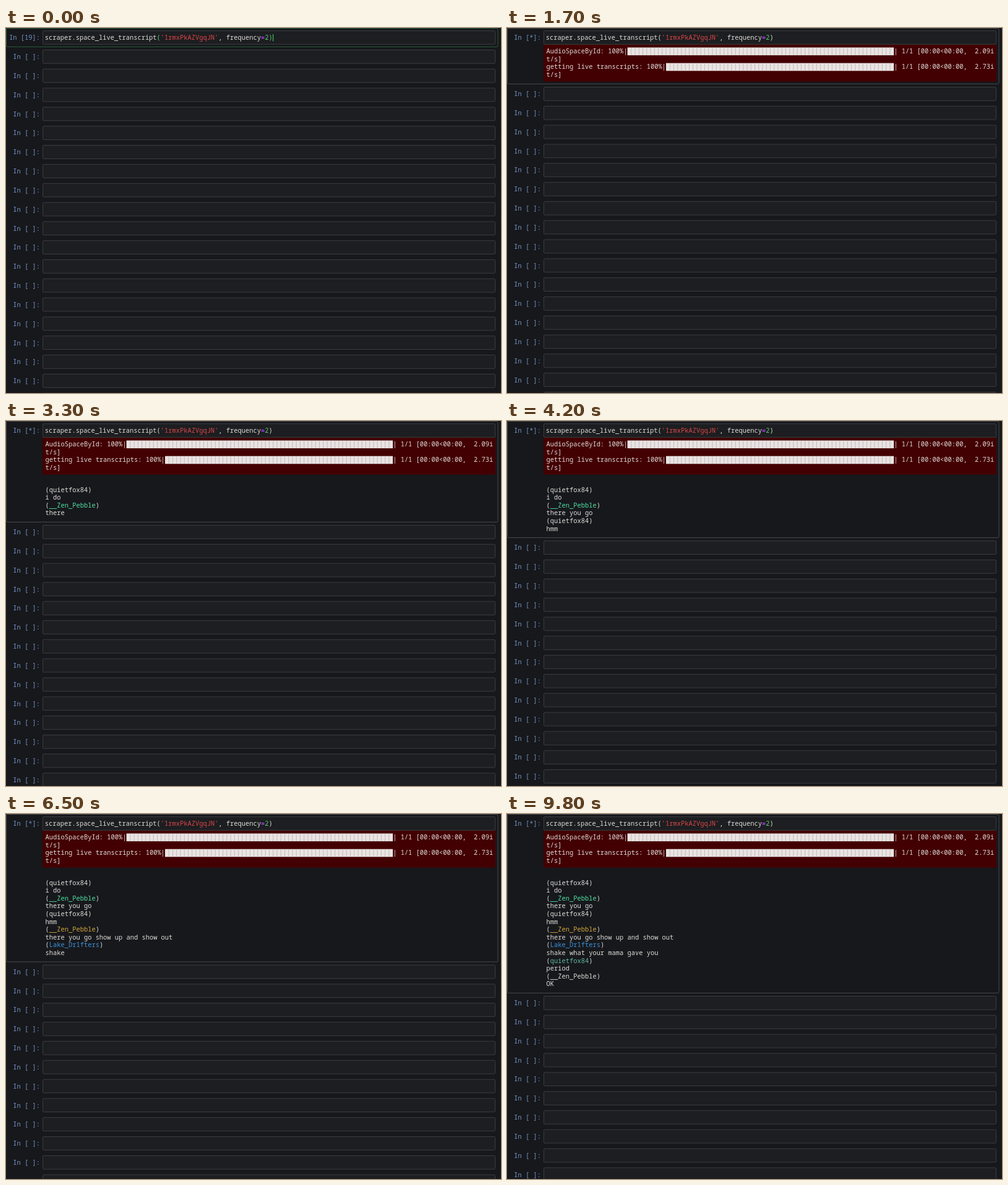
Recreate the animation shown at these times as an HTML page. Size 800 by 590 pixels, loop 10000 ms.

```html
<!DOCTYPE html>
<html>
<head>
<meta charset="utf-8">
<style>
html, body { margin: 0; width: 100%; height: 100%; overflow: hidden; background: #17181c; }
svg { display: block; }
text { font: 10.4px "Noto Sans Mono", "DejaVu Sans Mono", monospace; fill: #dedcd8; white-space: pre; }
.prompt { fill: #7595c4; text-anchor: end; }
.box { fill: #1d1e21; stroke: #3b3c3f; }
</style>
</head>
<body>
<svg id="stage" width="800" height="590" viewBox="0 0 800 590"></svg>
<script>
const LOOP = 10000, CHAR = 6.24, LINE = 12.6, LEFT = 63.6, COLS = 116;
const stage = document.getElementById('stage');

// label, time shown, time done, rate
const bars = [
  ['AudioSpaceById', 300, 800, '2.09'],
  ['getting live transcripts', 1200, 1600, '2.73'],
];

// speaker, colour, then pairs of time and words added
const WHITE = '#dedcd8';
const turns = [
  ['quietfox84', WHITE, 2300, 'i', 2700, ' do'],
  ['__Zen_Pebble', '#4fe0a0', 3200, 'there', 3600, ' you go'],
  ['quietfox84', WHITE, 3900, 'hmm'],
  ['__Zen_Pebble', '#d0a83c', 4400, 'there', 4700, ' you go', 5000, ' show up', 5200, ' and', 5500, ' show', 5900, ' out'],
  ['Lake_Dr1fters', '#3b93dc', 6400, 'shake', 6700, ' what', 6800, ' your', 6900, ' mama', 7100, ' gave you'],
  ['quietfox84', '#5fb8a0', 7900, 'period'],
  ['__Zen_Pebble', WHITE, 9000, 'OK'],
];

const escape = s => s.replace(/</g, '&lt;');
const text = (x, y, s, cls = '') => `<text x="${x}" y="${y}" class="${cls}">${s}</text>`;
const span = (s, color, extra = '') => `<tspan fill="${color}" ${extra}>${s}</tspan>`;
const rect = (x, y, w, h, attrs) => `<rect x="${x}" y="${y}" width="${w}" height="${h}" ${attrs}/>`;
const column = n => LEFT + n * CHAR;

function cell(center, label) {
  return rect(59.5, center - 11, 731, 21.8, 'rx="1.5" class="box"') +
    text(55, center + 3.7, label, 'prompt');
}

function progress([label, , doneAt, rate], t, y) {
  const done = t >= doneAt;
  const head = label + (done ? ': 100%|' : ':   0%|');
  const tail = done ? `| 1/1 [00:00<00:00,  ${rate}i` : '| 0/1 [00:00<?, ?i';
  const from = head.length, to = COLS - tail.length;
  let out = text(LEFT, y, head) + text(column(to), y, escape(tail)) + text(LEFT, y + LINE, 't/s]');
  if (done) {
    let seams = '';
    for (let n = from + 1; n < to; n++) seams += `M${column(n)} ${y - 9.7}v12.6`;
    out += rect(column(from), y - 9.7, (to - from) * CHAR, 12.6, 'fill="#e9e4e3"') +
      `<path d="${seams}" stroke="#b7a9a8" stroke-width=".7"/>`;
  }
  return out;
}

function draw(t) {
  const ready = t < 100;
  const shownBars = bars.filter(b => t >= b[1]);
  const shownTurns = turns.filter(turn => t >= turn[2]);
  let bottom = 30.4, out = '';

  if (shownBars.length) {
    const height = shownBars.length * 2 * LINE + 9.6;
    out += rect(59, 27, 732, height - .4, 'fill="#430002"');
    shownBars.forEach((b, i) => out += progress(b, t, 41.2 + i * 2 * LINE));
    bottom += height;
  }

  shownTurns.forEach(([name, color, ...words], i) => {
    const y = 114.6 + i * 2 * LINE;
    let said = '';
    for (let k = 0; k < words.length; k += 2) if (t >= words[k]) said += words[k + 1];
    out += text(LEFT, y, `(${span(name, color)})`) + text(LEFT, y + LINE, said);
  });
  if (shownTurns.length) bottom += 10 + LINE * (shownTurns.length * 2 + 1);

  const paren = ready ? '#52d273' : WHITE;
  const code = 'scraper.space_live_transcript' + span('(', paren) +
    span("'1rmxPkAZVgqJN'", '#dc4548') + ', frequency' +
    span('=', '#a83cf0', 'font-weight="bold"') + span('2', '#4fd069') + span(')', paren);
  const frame = rect(.5, .5, 794.5, bottom - .5, `rx="2" fill="none" stroke="${ready ? '#285a36' : '#48494c'}"`);

  let page = frame + cell(15.5, ready ? 'In [19]:' : 'In [*]:') + text(62.8, 19.2, code) + out;
  if (ready) page += rect(431.2, 10, 1, 11.5, 'fill="#52d273"');
  for (let c = bottom + 16.1; c < 605; c += 30.82) page += cell(c, 'In [ ]:');
  return page;
}

let last = '';
function tick() {
  const page = draw(performance.now() % LOOP);
  if (page !== last) stage.innerHTML = last = page;
  requestAnimationFrame(tick);
}
tick();
</script>
</body>
</html>
```
